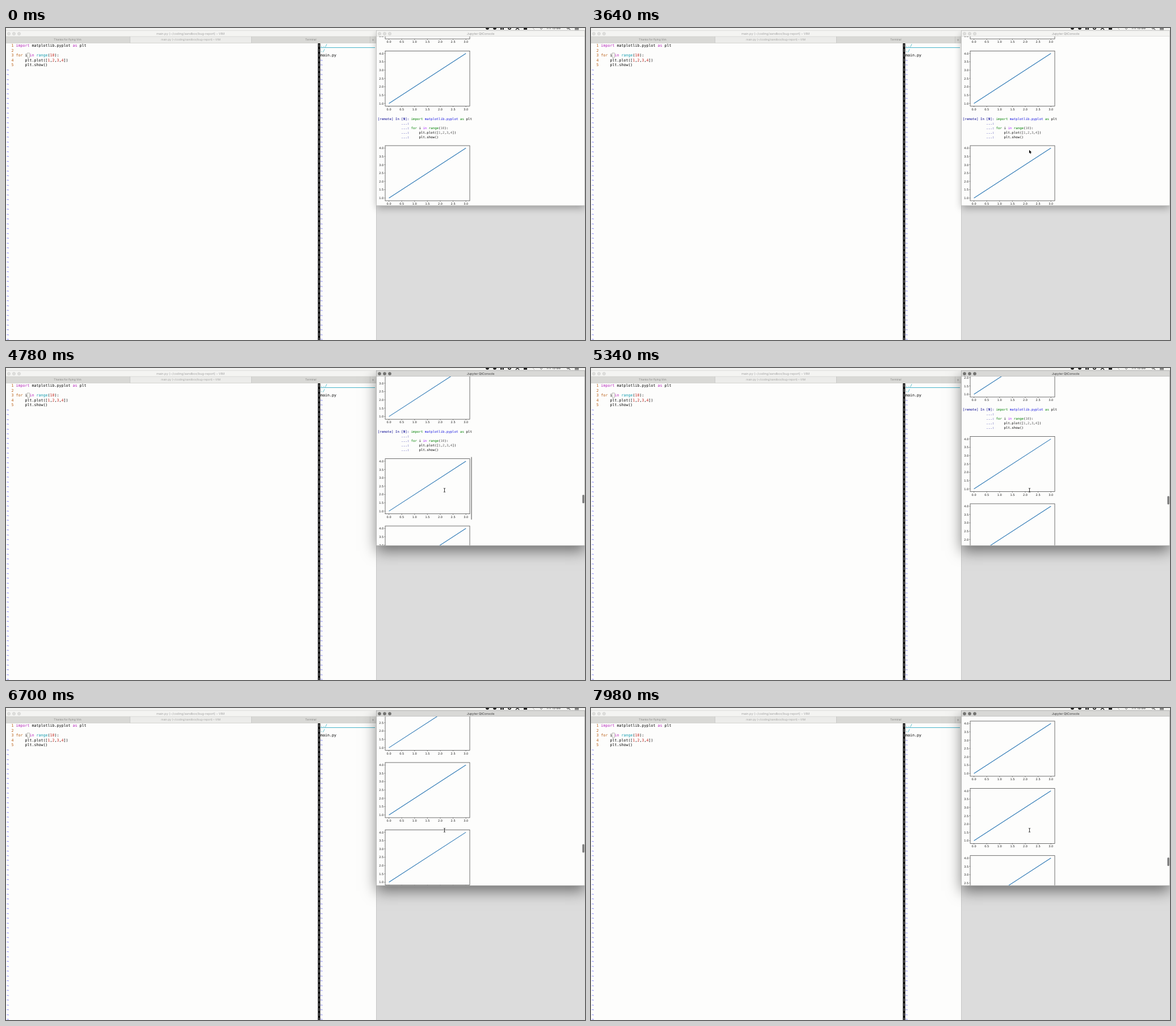
Write an HTML page with a canvas that moves like this. It is 1020 px wide and 549 px high and loops after 8000 ms.

```html
<!DOCTYPE html>
<html lang="en">
<head>
<meta charset="utf-8">
<title>Editor and console</title>
<style>
  html, body { margin: 0; width: 100%; height: 100%; overflow: hidden; background: #dcdcdc; }
  canvas { display: block; width: 1020px; height: 549px; }
</style>
</head>
<body>
<canvas id="stage" width="1020" height="549"></canvas>
<script>
const ctx = document.getElementById('stage').getContext('2d');
const LOOP = 8000;
const CLICK = 3860;
const MONO = '"DejaVu Sans Mono", monospace';
const SANS = 'Inter, "Liberation Sans", sans-serif';
const PAPER = '#fdfdfc';

// Scroll distance of the console over time: [ms, px]
const SCROLL = [[4150, 0], [4780, 47.3], [4880, 51], [5340, 86.3], [5440, 100],
  [6180, 267.5], [6280, 280], [7120, 415.1], [7980, 775.5], [8000, 780]];
const POINTER = [[2700, 1010, 540], [3300, 772, 214.5]];

const PLOT = { x: 668, w: 149, h: 97, pitch: 118.35, x0: 674.6, unitX: 45.2, y1: 92.2, unitY: 29.3 };

function track(keys, t) {
  if (t <= keys[0][0]) return keys[0][1];
  for (let i = 1; i < keys.length; i++) {
    const [t0, a] = keys[i - 1], [t1, b] = keys[i];
    if (t <= t1) return a + (b - a) * (t - t0) / (t1 - t0);
  }
  return keys[keys.length - 1][1];
}

function rect(x, y, w, h, color) {
  ctx.fillStyle = color;
  ctx.fillRect(x, y, w, h);
}

function dot(x, y, r, fill, stroke) {
  ctx.beginPath();
  ctx.arc(x, y, r, 0, 7);
  ctx.fillStyle = fill;
  ctx.fill();
  if (stroke) {
    ctx.strokeStyle = stroke;
    ctx.lineWidth = 0.5;
    ctx.stroke();
  }
}

function line(x0, y0, x1, y1, color, width = 1) {
  ctx.beginPath();
  ctx.moveTo(x0, y0);
  ctx.lineTo(x1, y1);
  ctx.strokeStyle = color;
  ctx.lineWidth = width;
  ctx.stroke();
}

function text(str, x, y, font, color, align = 'left') {
  ctx.font = font;
  ctx.fillStyle = color;
  ctx.textAlign = align;
  ctx.textBaseline = 'alphabetic';
  ctx.fillText(str, x, y);
}

// Draws [string, color, weight] pieces on a fixed character grid.
function code(pieces, x, y, size, advance) {
  let col = 0;
  for (const [str, color = '#000', weight = ''] of pieces) {
    text(str, x + col * advance, y, `${weight} ${size}px ${MONO}`, color);
    col += str.length;
  }
}

function lights(x, y, fill, stroke) {
  for (let i = 0; i < 3; i++) dot(x + i * 9, y, 2.6, fill, stroke);
}

function menuBar() {
  rect(0, 0, 1020, 5, '#f3f3f1');
  rect(0, 4, 1020, 1, '#dededc');
  for (const x of [848, 861, 887]) dot(x, 0, 3, '#222');
  dot(887, 0, 1.4, '#f3f3f1');
  rect(871, 0, 2.4, 3, '#222');
  rect(874.5, 0, 2.4, 3, '#222');
  line(898, 3, 901, 0, '#222', 1.4);
  line(904, 3, 901, 0, '#222', 1.4);
  rect(912, 0, 6, 3, '#222');
  line(928, 0, 931, 3, '#aaa');
  line(941, 0, 943, 2.5, '#777');
  line(945, 0, 943, 2.5, '#777');
  text('Fri 15:08', 953, 2.3, `6px ${SANS}`, '#222');
  dot(990, 0, 2, '#222');
  dot(990, 0, 1.2, '#f3f3f1');
  line(991.5, 1, 994, 3, '#222');
  line(1002, 0.5, 1009, 0.5, '#222');
  line(1002, 2.7, 1009, 2.7, '#222');
}

const MAGENTA = '#b21fb8', ORANGE = '#b85c12', CYAN = '#0c9aae', RED = '#c4261d';
const EDITOR_LINES = [
  [['import', MAGENTA], [' matplotlib.pyplot '], ['as', MAGENTA], [' plt']],
  [],
  [['for', ORANGE], [' i '], ['in', MAGENTA], [' '], ['range', CYAN], ['('], ['10', RED], ['):']],
  [['    plt.plot(['], ['1', RED], [','], ['2', RED], [','], ['3', RED], [','], ['4', RED], ['])']],
  [['    plt.show()']]
];
const rowY = row => 33.3 + row * 8.47;

function editor() {
  const size = 6.65, cw = 4.005;
  rect(0, 5, 652, 544, PAPER);
  rect(0, 5, 652, 10, '#f4f4f2');
  lights(5, 10, '#dededc', '#c8c8c6');
  text('main.py (~/coding/sandbox/bug-report) – VIM', 325, 12, `5.5px ${SANS}`, '#a0a0a0', 'center');

  rect(0, 15, 652, 11.5, '#d9d9d6');
  rect(218.5, 15, 213.5, 11.5, '#ececea');
  rect(0, 14.7, 652, 0.6, '#cacac8');
  rect(0, 26, 652, 0.6, '#c6c6c4');
  for (const x of [218, 432, 641]) rect(x, 15, 0.7, 11.5, '#c2c2c0');
  text('Thanks for flying Vim', 108.5, 22.2, `4.8px ${SANS}`, '#858583', 'center');
  text('main.py (~/coding/sandbox/bug-report) – VIM', 325.5, 22.2, `4.8px ${SANS}`, '#a3a3a1', 'center');
  text('Terminal', 537, 22.2, `4.8px ${SANS}`, '#858583', 'center');
  text('+', 646.5, 22.6, `7px ${SANS}`, '#8a8a88', 'center');

  EDITOR_LINES.forEach((pieces, row) => {
    code([[String(row + 1), ORANGE]], 9.4, rowY(row), size, cw);
    code(pieces, 17.4, rowY(row), size, cw);
  });
  ctx.strokeStyle = '#a9a9a0';
  ctx.lineWidth = 0.8;
  ctx.strokeRect(37.6, 44, 3.6, 8);

  for (let row = 0; row < 62; row++) {
    if (row >= 5) code([['~', '#2626ff']], 1.3, rowY(row), size, cw);
    if (row >= 3) code([['~', '#2626ff']], 554, rowY(row), size, cw);
  }
  rect(549.5, 27, 4, 522, '#000');
  for (let row = 0; row < 62; row++) rect(551.2, rowY(row) - 5, 0.8, 5.2, '#b5b5b5');

  code([['../', CYAN]], 554, rowY(0), size, cw);
  code([['./', CYAN]], 554, rowY(1), size, cw);
  code([['main.py']], 554, rowY(2), size, cw);
  line(554, 34.5, 650, 34.5, '#35acc4', 0.9);
}

function plot(top) {
  if (top > 315 || top < -95) return;
  const { x, w, h, x0, unitX, y1, unitY } = PLOT;
  const font = '5px "DejaVu Sans", sans-serif';
  ctx.strokeStyle = '#333';
  ctx.lineWidth = 0.7;
  ctx.strokeRect(x, top, w, h);
  for (let i = 0; i <= 6; i++) {
    const px = x0 + i * unitX / 2, py = top + y1 - i * unitY / 2;
    line(px, top + h, px, top + h + 1.7, '#333', 0.6);
    line(x - 1.7, py, x, py, '#333', 0.6);
    text((i / 2).toFixed(1), px, top + h + 7, font, '#111', 'center');
    text((1 + i / 2).toFixed(1), x - 2.8, py + 1.9, font, '#111', 'right');
  }
  line(x0, top + y1, x0 + 3 * unitX, top + y1 - 3 * unitY, '#2f7ab5', 1.1);
}

const NAVY = '#000090', GREEN = '#008000', GRAY = '#666';
const INPUT_LINES = [
  [['[remote] In [', NAVY], ['9', NAVY, 'bold'], [']: ', NAVY], ['import', GREEN], [' '],
    ['matplotlib.pyplot', '#1414e0'], [' '], ['as', GREEN], [' plt']],
  [['            ...: ', NAVY]],
  [['            ...: ', NAVY], ['for', GREEN], [' i '], ['in', '#aa22ff'], [' '], ['range', GREEN],
    ['('], ['10', GRAY], ['):']],
  [['            ...: ', NAVY], ['    plt.plot(['], ['1', GRAY], [','], ['2', GRAY], [','],
    ['3', GRAY], [','], ['4', GRAY], ['])']],
  [['            ...: ', NAVY], ['    plt.show()']]
];

function consoleWindow(t) {
  const active = t >= CLICK;
  const scroll = track(SCROLL, t);
  const left = 652.5, top = 4.5, width = 367, height = 308;

  ctx.save();
  ctx.beginPath();
  ctx.rect(0, 5, 1020, 544);
  ctx.clip();
  ctx.shadowColor = active ? 'rgba(0,0,0,.5)' : 'rgba(0,0,0,.32)';
  ctx.shadowBlur = active ? 24 : 13;
  ctx.shadowOffsetY = active ? 9 : 4;
  rect(left, top, width, height, PAPER);
  ctx.restore();

  rect(left, top, width, height, PAPER);
  rect(left, top, width, 10.3, active ? '#d8d8d6' : '#f4f4f2');
  rect(left, 14.4, width, 0.6, active ? '#b4b4b2' : '#d2d2d0');
  lights(658, 10, active ? '#737371' : '#dededc', active ? '#666664' : '#c4c4c2');
  text('Jupyter QtConsole', 836, 12, `5.5px ${SANS}`, active ? '#3a3a3a' : '#999', 'center');

  ctx.save();
  ctx.beginPath();
  ctx.rect(left, 15, width, 297);
  ctx.clip();
  const firstTop = 207 - scroll;
  plot(40.5 - PLOT.pitch - scroll);
  plot(40.5 - scroll);
  INPUT_LINES.forEach((pieces, i) => code(pieces, 654.8, 161.6 + i * 8 - scroll, 5.75, 3.46));
  // The first output fills the view until scrolling reveals the others.
  for (let i = 0; i < 10; i++) plot(firstTop + i * PLOT.pitch);
  if (active && (t - CLICK + 410) % 1000 < 500) {
    line(820, firstTop - 3, 820, firstTop + 107, '#333', 0.9);
  }
  ctx.restore();

  if (t > SCROLL[0][0]) {
    ctx.beginPath();
    ctx.roundRect(1015.4, 220.4 + scroll * 0.055, 3.3, 15, 1.6);
    ctx.fillStyle = '#777';
    ctx.fill();
  }
  ctx.strokeStyle = active ? '#a2a2a0' : '#b4b4b2';
  ctx.lineWidth = 0.7;
  ctx.strokeRect(left, top, width, height);
}

function pointer(t) {
  const [from, to] = POINTER;
  if (t < from[0]) return;
  if (t >= CLICK) {
    line(772.5, 212, 772.5, 218, '#222', 0.9);
    line(770.8, 211.8, 774.2, 211.8, '#222', 0.8);
    line(770.8, 218.2, 774.2, 218.2, '#222', 0.8);
    return;
  }
  const p = Math.min(1, (t - from[0]) / (to[0] - from[0]));
  const ease = p * p * (3 - 2 * p);
  ctx.save();
  ctx.translate(from[1] + (to[1] - from[1]) * ease, from[2] + (to[2] - from[2]) * ease);
  ctx.fill
  ctx.beginPath();
  for (const [x, y] of [[0, 0], [0, 6], [1.3, 4.8], [2.3, 7], [3.3, 6.6], [2.4, 4.5], [4.2, 4.4]]) ctx.lineTo(x, y);
  ctx.closePath();
  ctx.strokeStyle = '#fff';
  ctx.lineWidth = 0.9;
  ctx.stroke();
  ctx.fillStyle = '#000';
  ctx.fill();
  ctx.restore();
}

function draw(t) {
  ctx.textRendering = 'geometricPrecision';
  rect(0, 0, 1020, 549, '#dcdcdc');
  menuBar();
  editor();
  rect(652, 5, 0.7, 544, '#bdbdbd');
  consoleWindow(t);
  pointer(t);
}

const start = performance.now();
function tick() {
  draw((performance.now() - start) % LOOP);
  requestAnimationFrame(tick);
}
tick();
</script>
</body>
</html>
```
